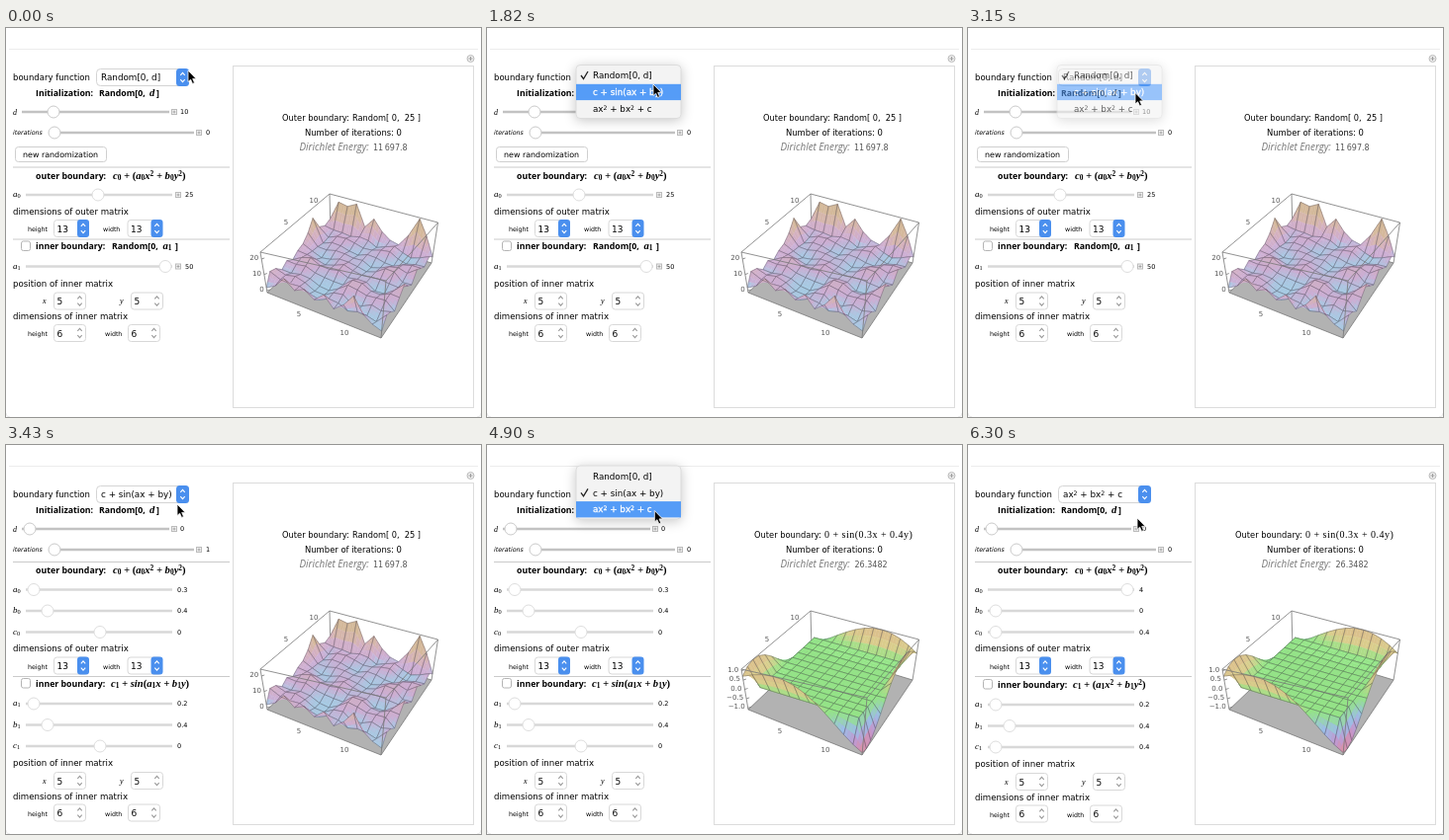
Recreate the animation shown at these times as an HTML page. Size 480 px wide and 394 px high, loop 6370 ms.

```html
<!DOCTYPE html>
<html lang="en">
<head>
<meta charset="utf-8">
<title>Boundary function</title>
<style>
  html, body { margin: 0; width: 100%; height: 100%; overflow: hidden; background: #fff; }
  svg { display: block; width: 480px; height: 394px; }
  text { font-family: "DejaVu Sans", sans-serif; white-space: pre; fill: #000; }
  .b { font-family: "Open Sans", sans-serif; font-weight: 700; }
  .i { font-style: italic; }
  .m { font-family: "Liberation Serif", serif; font-style: italic; }
  .mb { font-family: "Liberation Serif", serif; font-style: italic; font-weight: 700; }
  .s { font-family: "Liberation Serif", serif; letter-spacing: .48px; }
  .e { font-family: "Open Sans", sans-serif; font-style: italic; fill: #777; }
  .g { fill: #555; }
  .on { fill: #fff; stroke: #fff; stroke-width: .3px; }
  .up { font-style: normal; }
  .menu { filter: drop-shadow(0 2px 6px rgba(0, 0, 0, .22)); }
</style>
</head>
<body>
<svg id="stage" viewBox="0 0 480 394"></svg>
<script>
const LOOP = 6370, STEP = 70;

// ---- markup helpers ----
const shift = (c, by) => `<tspan class="up" baseline-shift="${by}" font-size="70%">${c}</tspan>`;
const script = s => s.replace(/_(.)/g, (_, c) => shift(c, '-18%')).replace(/\^(.)/g, (_, c) => shift(c, '38%'));
const text = (x, y, s, size = 8.6, cls = '') =>
  `<text x="${x}" y="${y}" font-size="${size}" class="${cls}">${script(s)}</text>`;
const formula = (x, y, s) => text(x, y, s.replace(/[()]/g, '<tspan class="up">$&</tspan>'), 10.6, 'mb');
const rect = (x, y, w, h, fill, stroke = 'none', r = 0) =>
  `<rect x="${x}" y="${y}" width="${w}" height="${h}" rx="${r}" fill="${fill}" stroke="${stroke}"/>`;
const path = (d, stroke, w = 1, fill = 'none') =>
  `<path d="${d}" fill="${fill}" stroke="${stroke}" stroke-width="${w}"/>`;
const group = (id, s, cls = '') => `<g id="${id}" class="${cls}">${s}</g>`;
const rule = y => path(`M7 ${y}H226`, '#cacaca');

const chevrons = (x, y, c) =>
  path(`M${x - 2.2} ${y - 2.2}l2.2 -2.4l2.2 2.4M${x - 2.2} ${y + 2.2}l2.2 2.4l2.2 -2.4`, c, 1.1);

const plus = (x, y) => rect(x - 2.5, y - 2.5, 5, 5, '#f2f2f2', '#bbb') +
  path(`M${x - 1.5} ${y}h3M${x} ${y - 1.5}v3`, '#999', .8);

function slider(y, from, to, at, muted) {
  return path(`M${from} ${y}H${to}`, muted ? '#d8d8d8' : '#c2c2c2', 2.5) +
    `<circle cx="${at}" cy="${y}" r="6" fill="#fff" stroke="${muted ? '#dadada' : '#c4c4c4'}" stroke-width=".9"/>`;
}

function numberBox(x, y, value, blue) {
  return rect(x + .5, y - 8.5, blue ? 34 : 32, 17, '#fff', '#d8d8d8', 3) +
    (blue ? rect(x + 24, y - 9, 12, 18, '#4a8fee', 'none', 3) : '') +
    chevrons(x + (blue ? 30 : 26.5), y, blue ? '#fff' : '#999') +
    text(x + 3.5, y + 3.5, value, 9);
}

const sizeRow = (y, value, blue) =>
  text(22, y + 3, 'height', 6.3) + numberBox(48, y, value, blue) +
  text(blue ? 98 : 100, y + 3, 'width', 6.3) + numberBox(blue ? 122.5 : 123, y, value, blue);

// ---- left controls ----
function rows(y, items, withPlus) {
  return items.map(([name, at, value], k) => {
    const cy = y + 21.5 * k;
    return text(7, cy + 2, name, 9, 'm') + slider(cy, 20, 168, at, true) +
      (withPlus ? plus(174, cy) : '') + text(withPlus ? 181 : 173, cy + 2.3, value, 6.5);
  }).join('');
}

function panel(id, { fn, d, dx, y, outer, inner, form, innerForm, drop = 0 }) {
  const random = id === 'A';
  const end = y + 21.5 * (outer.length - 1);
  const first = end + 72.5 + drop;
  const last = first + 21.5 * (inner.length - 1);
  const head = end + 55 + drop;
  return group(id,
    text(96, 53, fn, 8.8) +
    slider(85, 16, 165, dx) + plus(170, 85) + text(176, 87.3, d, 6.5) +
    (random ? rect(9.5, 120.5, 92, 15, '#fff', '#cfcfcf', 3) + text(17, 131, 'new randomization', 7.95) : '') +
    rule(y - 28) +
    text(30, y - 16.3, 'outer boundary:', 8.75, 'b') + formula(108, y - 16.5, form) +
    rows(y, outer, random) +
    text(7, end + 19.5, 'dimensions of outer matrix', 8.64) + sizeRow(end + 34, '13', true) +
    rule(end + 45) +
    rect(15.5, head - 8, 9, 9.5, '#fff', '#b4b4b4', 2) +
    text(30, head, 'inner boundary:', 8.75, 'b') +
    (random
      ? text(107, head, 'Random[0, ', 8.75, 'b') + formula(158.5, head, 'a_1') + text(171, head, ']', 8.75, 'b')
      : formula(106, head, innerForm)) +
    rows(first, inner, random) +
    text(7, last + 20, 'position of inner matrix', 8.64) +
    text(37, last + 37.5, 'x', 8, 'm') + numberBox(48, last + 35, '5') +
    text(115, last + 37.5, 'y', 8, 'm') + numberBox(126, last + 35, '5') +
    text(7, last + 53.5, 'dimensions of inner matrix', 8.64) + sizeRow(last + 67.5, '6'));
}

const quad = n => `c_${n} + (a_${n}x^2 + b_${n}y^2)`;
const panels =
  panel('A', { fn: 'Random[0, d]', d: '10', dx: 48, y: 169, form: quad(0),
    outer: [['a_0', 93, '25']], inner: [['a_1', 161, '50']] }) +
  panel('B', { fn: 'c + sin(ax + by)', d: '0', dx: 24, y: 146.5, form: quad(0), innerForm: 'c_1 + sin(a_1x + b_1y)',
    outer: [['a_0', 28, '0.3'], ['b_0', 42, '0.4'], ['c_0', 95, '0']],
    inner: [['a_1', 28, '0.2'], ['b_1', 42, '0.4'], ['c_1', 95, '0']] }) +
  panel('C', { fn: 'ax^2 + bx^2 + c', d: '0', dx: 24, y: 146.5, form: quad(0), innerForm: quad(1), drop: 1,
    outer: [['a_0', 161, '4'], ['b_0', 28, '0'], ['c_0', 28, '0.4']],
    inner: [['a_1', 28, '0.2'], ['b_1', 42, '0.4'], ['c_1', 28, '0.4']] });

const frame =
  path('M3 21.5H477M0 390Q0 394 4 394M476 394Q480 394 480 390', '#ececec') +
  rect(229.5, 38.5, 243, 346, '#fff', '#dcdcdc') +
  '<circle cx="469.5" cy="31" r="3.5" fill="#eee" stroke="#bbb"/>' + path('M467.5 31h4M469.5 29v4', '#999', .9) +
  text(7, 53, 'boundary function', 8.5) +
  rect(91.5, 41.5, 93, 17, '#fff', '#d4d4d4', 4) + rect(172, 41, 13, 18, '#4a8fee', 'none', 3.5) + chevrons(178.5, 50, '#fff') +
  text(30, 69, 'Initialization:', 8.75, 'b') + text(94, 69, 'Random[0, ', 8.75, 'b') +
  formula(145, 69, 'd') + text(152, 69, ']', 8.75, 'b') +
  text(7, 87.5, 'd', 8, 'm') +
  text(7, 108, 'iterations', 6.3, 'i') + slider(106, 43, 190, 49) + plus(195, 106);

// ---- surface plots ----
const base = [[264, 268], [379, 314], [328, 207], [430, 238]];
const lid = [[257, 227], [384, 256], [327, 168], [436.5, 197]];
const mix = (a, b, t) => a.map((p, k) => p + (b[k] - p) * t);
const onFace = (f, u, v) => mix(mix(f[0], f[1], u), mix(f[2], f[3], u), v);
const project = (u, v, w) => mix(onFace(base, u, v), onFace(lid, u, v), w).map(n => n.toFixed(1));
const poly = pts => 'M' + pts.map(p => p.join(' ')).join('L') + 'Z';
const edges = list => path(list.map(([p, q]) => `M${p}L${q}`).join(''), '#777', .8);
const corners = (i, j, d) => [[i, j], [i + d, j], [i + d, j + d], [i, j + d]];

function shade(stops, w) {
  const k = Math.max(1, stops.findIndex(s => s[0] >= w));
  const [a, b] = [stops[k - 1], stops[k]];
  const c = mix(a.slice(1), b.slice(1), Math.min(1, (w - a[0]) / (b[0] - a[0])));
  return `rgb(${c.map(Math.round)})`;
}

function plot(height, stops, zTicks) {
  // bilinear between grid nodes, so each cell can be shaded in smaller patches
  const level = (x, y) => {
    const i = Math.min(11, Math.floor(x)), j = Math.min(11, Math.floor(y)), p = x - i;
    const near = height(i, j) * (1 - p) + height(i + 1, j) * p;
    const far = height(i, j + 1) * (1 - p) + height(i + 1, j + 1) * p;
    return near + (far - near) * (y - j);
  };
  const at = ([x, y]) => project(x / 12, y / 12, level(x, y));
  const [b0, b1, b2, b3] = base, [t0, t1, t2, t3] = lid;
  const parts = 3, d = 1 / parts;
  let s = path(poly([b0, b1, b3, b2]), 'none', 0, '#b2b2b2') + edges([[b0, b2], [b2, b3], [b2, t2]]);
  for (let j = 11; j >= 0; j--) for (let i = 0; i < 12; i++) {
    for (let n = parts - 1; n >= 0; n--) for (let m = 0; m < parts; m++) {
      const x = i + m * d, y = j + n * d;
      const tone = shade(stops, level(x + d / 2, y + d / 2));
      s += path(poly(corners(x, y, d).map(at)), tone, .4, tone);
    }
    s += path(poly(corners(i, j, 1).map(at)), 'rgba(50,42,55,.62)', .5);
  }
  s += edges([[b0, b1], [b1, b3], [t0, t1], [t1, t3], [t1, b1], [t0, b0], [t3, b3], [t0, t2], [t2, t3]]);
  const tick = (x, y, label) => `<text x="${x}" y="${y + 2.5}" font-size="7" text-anchor="middle" class="g">${label}</text>`;
  s += tick(296, 289, 5) + tick(342, 308, 10) + tick(283, 196, 5) + tick(311, 174, 10);
  for (const [label, w] of zTicks) {
    const [x, y] = mix(b0, t0, w);
    s += path(`M${x} ${y}l3 -1`, '#666', .7) +
      `<text x="${x - 3}" y="${y + 1}" font-size="7" text-anchor="end" class="g">${label}</text>`;
  }
  return s;
}

const front = [.12, .25, .5, .3, .4, .25, .42, .2, .35, .58, .3, .18, .12];
const back = [.35, .85, .8, .92, .4, .66, .4, .25, .2, .5, .97, .6, .15];
const left = [.12, .4, .35, .2, .3, .2, .3, .35, .5, .75, .4, .3, .35];
const right = [.12, .3, .25, .15, .3, .45, .3, .2, .4, .3, .2, .3, .15];
const noise = (i, j) => { const n = Math.sin(i * 12.99 + j * 78.23) * 43758.55; return n - Math.floor(n); };
const soft = (i, j) => (noise(i, j) + noise(i + 1, j) + noise(i, j + 1) + noise(i + 1, j + 1)) / 4;
const rough = (i, j) => j === 0 ? front[i] : j === 12 ? back[i] : i === 0 ? left[j] : i === 12 ? right[j] : .02 + .42 * soft(i, j);
const wave = (i, j) => i % 12 && j % 12 ? .5 : .5 + .5 * Math.sin(.3 * (i + 1) + .4 * (j + 1));

const roughTones = [[0, 160, 212, 230], [.17, 172, 200, 228], [.27, 205, 174, 212], [.42, 212, 176, 190], [.62, 214, 186, 158], [1, 206, 182, 146]];
const waveTones = [[0, 229, 143, 150], [.15, 196, 150, 205], [.3, 156, 190, 232], [.5, 148, 229, 134], [.72, 218, 205, 140], [1, 219, 188, 140]];

const results = text(302, 108.5, 'Number of iterations: 0', 8.41) + text(296.5, 123.5, 'Dirichlet Energy:', 9.9, 'e') +
  group('plotA',
    text(279, 94, 'Outer boundary:', 8.3) + text(350, 94, 'Random[ 0,  25 ]', 8.2) + text(371, 123.5, '11\u2009697.8', 8, 'g') +
    plot(rough, roughTones, [['0', .05], ['10', .45], ['20', .83]])) +
  group('plotB',
    text(270, 94, 'Outer boundary:', 8.3) + text(341, 94, '0 + sin(0.3x + 0.4y)', 10, 's') + text(371.5, 123.5, '26.3482', 8, 'g') +
    plot(wave, waveTones, [['\u22121.0', .04], ['\u22120.5', .27], ['0.0', .5], ['0.5', .73], ['1.0', .96]]));

// ---- pop-up menu ----
const items = ['Random[0, d]', 'c + sin(ax + by)', 'ax^2 + bx^2 + c'];
function menu(top, checked, hot, blank) {
  return rect(90, top, 106, 54, '#f3f3f3', '#dcdcdc', 4) + items.map((s, k) => {
    const y = top + 10.5 + 16.8 * k, cls = k === hot ? 'on' : '';
    if (k === hot && blank) return '';
    return (k === hot ? rect(90, y - 8, 106, 16.3, '#559cf7') : '') +
      (k === checked ? path(`M95 ${y}l2.5 3.5l4.5 -7.5`, cls ? '#fff' : '#222', 1.3) : '') +
      text(107, y + 3.2, s, 8.75, cls);
  }).join('');
}

document.getElementById('stage').innerHTML = frame + panels + text(202, 108.3, '0', 6.5).replace('<text', '<text id="count"') +
  results + group('menu', '', 'menu') +
  '<circle id="ring" r="15" fill="none" stroke="#111" stroke-width="2.1"/>' +
  group('cursor', path('M0 0V11.5L2.6 9.2L4.5 13.4L6.5 12.5L4.7 8.4H8.2Z', '#fff', .8, '#000'));

// ---- timeline ----
const $ = id => document.getElementById(id);
const show = (id, on) => { $(id).style.display = on ? '' : 'none'; };
const within = (t, a, b) => t >= a && t < b;
const clicks = [[350, 840], [2660, 2950], [4060, 4500], [5320, 5610]];
const trail = [[0, 184, 43], [280, 180, 46], [1120, 180, 46], [1750, 168, 57], [1890, 168, 57], [2450, 165, 71],
  [2940, 165, 71], [3360, 173, 60], [3500, 173, 60], [3920, 171, 53], [4480, 171, 53], [5040, 169, 69],
  [5810, 169, 69], [6230, 171, 74], [LOOP, 171, 74]];

function pointer(t) {
  const k = trail.findIndex(p => p[0] > t);
  const a = trail[k - 1], b = trail[k], p = (t - a[0]) / (b[0] - a[0]);
  return mix(a.slice(1), b.slice(1), p * p * (3 - 2 * p));
}

let menuKey = '';
function draw(now) {
  const t = Math.floor(now % LOOP / STEP) * STEP;
  show('A', t < 3360);
  show('B', within(t, 3360, 6090));
  show('C', t >= 6090);
  show('plotA', t < 3570);
  show('plotB', t >= 3570);
  $('count').textContent = within(t, 3360, 3570) ? 1 : 0;

  const firstMenu = within(t, 560, 3290), open = firstMenu || within(t, 4130, 6020);
  show('menu', open);
  if (open) {
    const args = firstMenu ? [37.5, 0, t < 1680 ? 0 : 1, t === 3010] : [21, 1, t < 4620 ? 1 : 2, t === 5670];
    if (menuKey !== args.join()) {
      menuKey = args.join();
      $('menu').innerHTML = menu(...args);
    }
    const fade = t - (firstMenu ? 3150 : 5950);
    $('menu').style.opacity = fade < 0 ? 1 : fade ? .25 : .6;
  }

  const [x, y] = pointer(t);
  $('cursor').setAttribute('transform', `translate(${x} ${y})`);
  $('ring').setAttribute('cx', x);
  $('ring').setAttribute('cy', y + 1);
  show('ring', clicks.some(([a, b]) => within(t, a, b)));
  requestAnimationFrame(tick);
}
const start = performance.now();
const tick = () => draw(performance.now() - start);
tick();
</script>
</body>
</html>
```
